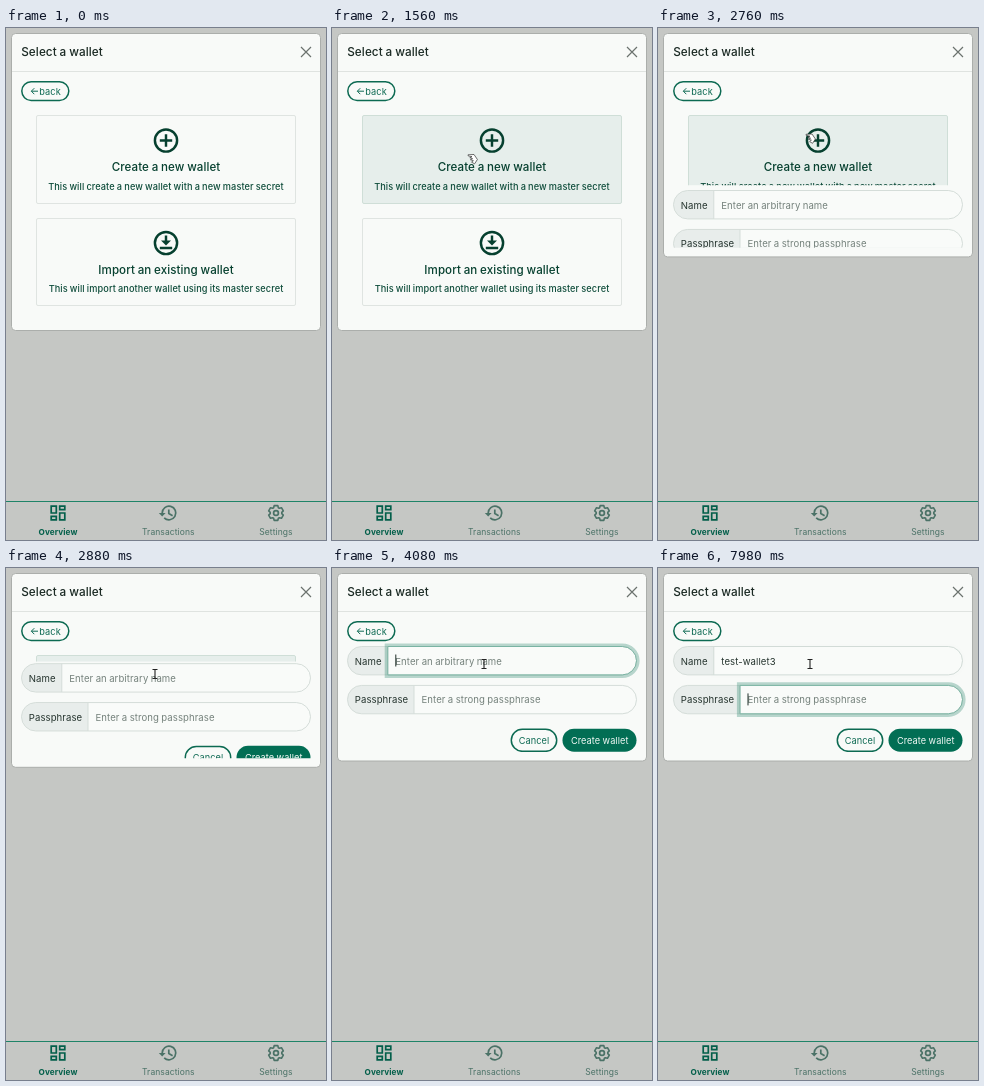
An HTML page for the animation above (8 s loop, 320 by 512 pixels).

```html
<!DOCTYPE html>
<html lang="en">
<head>
<meta charset="utf-8">
<title>Select a wallet</title>
<style>
html, body { margin: 0; height: 100%; overflow: hidden; background: #c5c7c4; }
svg { display: block; width: 100vw; height: 100vh; }
text { font: 400 9.55px Inter, "Open Sans", sans-serif; letter-spacing: .08px; word-spacing: -.4px; fill: #26352f; white-space: pre; }
.mid { text-anchor: middle; }
.title { font-size: 11.75px; font-weight: 500; fill: #1b2a24; }
.heading { font-size: 11.55px; font-weight: 500; fill: #06402f; }
.sub { font-size: 9.2px; font-weight: 500; fill: #0f4d3b; }
.button { font-size: 9.2px; fill: #0f6b54; }
.hint { fill: #75827c; }
.nav { font-size: 8.5px; fill: #4b7267; }
.nav.on { font-size: 8.2px; font-weight: 700; fill: #035f4a; }
.line { fill: none; stroke: #4b7267; stroke-width: 1.7; }
.outline { fill: none; stroke: #0c6a52; stroke-width: 1.5; }
.icon { fill: none; stroke: #06402f; stroke-width: 2.45; }
.card { fill: #f8faf8; stroke: #dfe4e1; }
.card.hover { fill: #e6eeeb; stroke: #cfded7; }
.glow { fill: none; stroke: #006e52; stroke-opacity: .27; stroke-width: 3; }
.edge { fill: none; stroke: #78b3a2; }
.pointer { fill: #fff; stroke: #333; stroke-width: .7; stroke-linejoin: round; }
</style>
</head>
<body>
<svg viewBox="0 0 320 512">
  <defs>
    <clipPath id="listClip"><rect y="77" width="320"/></clipPath>
    <clipPath id="formClip"><rect y="70" width="320"/></clipPath>
  </defs>

  <path d="M0 473.5H320" stroke="#1f8468"/>
  <path fill="#035f4a" transform="translate(41.8 474.8) scale(.85)" d="M19 5v2h-4V5h4M9 5v6H5V5h4m10 8v6h-4v-6h4M9 17v2H5v-2h4M21 3h-8v6h8V3zM11 3H3v10h8V3zm10 8h-8v10h8V11zm-10 4H3v6h8v-6z"/>
  <g class="line" transform="translate(163 485)">
    <path d="M-6.8 0A6.8 6.8 0 1 1-4.8 4.8M-.2-3.6V.5L3.6 2.7"/>
    <path d="M-10.2 0H-3.4L-6.8 3.4Z" fill="#4b7267" stroke="none"/>
  </g>
  <g class="line" transform="translate(270 485)">
    <path id="gear" stroke-linejoin="round" stroke-width="1.6"/><circle r="2.4"/>
  </g>
  <text class="nav on mid" x="52" y="507">Overview</text>
  <text class="nav mid" x="162.3" y="507">Transactions</text>
  <text class="nav mid" x="270" y="507">Settings</text>

  <rect id="modal" x="5.5" y="5.5" width="309" rx="4" fill="#f8faf8" stroke="#abaeab"/>
  <path d="M6 43.5H314" stroke="#dfe3e0"/>
  <text class="title" x="15.2" y="28.3">Select a wallet</text>
  <path d="M295 19l10 10m0-10l-10 10" stroke="#6b726e" stroke-width="1.2"/>
  <rect class="outline" x="15.8" y="53.8" width="47" height="18.6" rx="9.3"/>
  <path d="M32 63.2H25.5M28.3 60.2L25.3 63.2L28.3 66.2" fill="none" stroke="#0f6b54"/>
  <text class="button" x="33.3" y="66.5">back</text>

  <g clip-path="url(#listClip)">
    <rect class="card" x="30.5" y="87.5" width="259" height="88" rx="1.5"/>
    <g class="icon" transform="translate(160 112.5)"><circle r="11.1"/><path d="M-6.2 0H6.2M0-6.2V6.2"/></g>
    <text class="heading mid" x="160" y="143.1">Create a new wallet</text>
    <text class="sub mid" x="160" y="161.7">This will create a new wallet with a new master secret</text>
    <rect class="card" x="30.5" y="190.5" width="259" height="87" rx="1.5"/>
    <g class="icon" transform="translate(160 215)">
      <circle r="11.1"/><path d="M-6.2 5H6.2M0-7.4V-2"/>
      <path d="M-5-2.5H5L0 2.5Z" fill="#06402f" stroke="none"/>
    </g>
    <text class="heading mid" x="160" y="245.6">Import an existing wallet</text>
    <text class="sub mid" x="160" y="264">This will import another wallet using its master secret</text>
  </g>

  <g id="form"><g clip-path="url(#formClip)">
    <g id="fields"></g>
    <rect class="outline" x="179.3" y="161.3" width="45.4" height="22" rx="11"/>
    <text class="button mid" x="202" y="176">Cancel</text>
    <rect x="230.5" y="160.7" width="74" height="23" rx="11.5" fill="#026e54"/>
    <text class="button mid" x="267.7" y="176" style="fill:#f3f9f6">Create wallet</text>
  </g></g>

  <g id="cursor">
    <path class="pointer" d="M0 0V10.5L2.5 8.2 4.2 11.8 5.7 11.1 4.1 7.6H7.4Z"/>
    <path class="pointer" d="M-1 .3L5 0 8.4 5 5.6 9.3 2.6 7.6 4.4 6.2 1.4 5.2 3.6 4.2 .8 3.2 3 2.2-.8 1.4Z"/>
    <path d="M-2.5-4.5H2.5M0-4.5V4.5M-2.5 4.5H2.5" fill="none" stroke="#222" stroke-width="1.1"/>
  </g>
</svg>
<script>
const $ = id => document.getElementById(id);
const all = selector => [...document.querySelectorAll(selector)];
const clamp = v => Math.max(0, Math.min(1, v));
const smooth = v => v * v * (3 - 2 * v);
const cubicOut = v => 1 - (1 - v) ** 3;
const progress = (t, start, length) => clamp((t - start) / length);

const LOOP = 8000, FOCUS_NAME = 3960, FOCUS_PASS = 7845, BLINK = 540;
const WORD = 'test-wallet3';
const KEYS = [5130, 5220, 5280, 5370, 6150, 6300, 6360, 6450, 6570, 6660, 6750, 7170];
const PATH = [ // time, x, y
  [270, 110, 4], [690, 20, 493], [1080, 105, 272], [1380, 152, 68],
  [1560, 137, 126.5], [1890, 149, 106], [3660, 149, 106], [3930, 152, 96]
];

let gear = '';
for (let i = 0; i < 6; i++)
  for (const [angle, r] of [[-24, 5.8], [-14, 7.6], [14, 7.6], [24, 5.8]]) {
    const a = (i * 60 + angle - 90) * Math.PI / 180;
    gear += `${gear ? 'L' : 'M'}${r * Math.cos(a)} ${r * Math.sin(a)}`;
  }
$('gear').setAttribute('d', gear + 'Z');

// Box with square left corners and a round right end
const inputShape = (x, y, grow) => {
  const r = 14.2 + grow;
  return `M${x - grow} ${y - grow}H${304.5 - 14.2}a${r} ${r} 0 0 1 0 ${2 * r}H${x - grow}Z`;
};
const field = (y, split, label, hint) => `
  <rect x="15.5" y="${y}" width="289" height="28.4" rx="14.2" fill="#e8edeb"/>
  <path d="${inputShape(split, y, 0)}" fill="#f9fbf9"/>
  <rect x="15.5" y="${y}" width="289" height="28.4" rx="14.2" fill="none" stroke="#d5ddd9"/>
  <path d="M${split} ${y}v28.4" stroke="#d5ddd9"/>
  <text x="22.8" y="${y + 18}">${label}</text>
  <g class="focus">
    <path class="glow" d="${inputShape(split, y, 1.6)}"/>
    <path class="edge" d="${inputShape(split, y, 0)}"/>
  </g>
  <text class="value hint" x="${split + 7.5}" y="${y + 18}">${hint}</text>
  <rect class="caret" x="${split + 7.5}" y="${y + 8}" width="1" height="12" fill="#20302a"/>`;
const HINT = 'Enter an arbitrary name';
$('fields').innerHTML = field(78.5, 55.8, 'Name', HINT) +
  field(117.4, 82, 'Passphrase', 'Enter a strong passphrase');

const cards = all('.card'), focus = all('.focus'), carets = all('.caret');
const nameText = all('.value')[0];
const pointers = [...$('cursor').children];
const listRect = all('#listClip rect')[0], formRect = all('#formClip rect')[0];
const show = (el, on) => el.setAttribute('visibility', on ? 'visible' : 'hidden');

function cursorAt(t) {
  const i = PATH.findIndex(p => p[0] > t);
  if (i < 0) return PATH[PATH.length - 1].slice(1);
  if (!i) return PATH[0].slice(1);
  const [t0, x0, y0] = PATH[i - 1], [t1, x1, y1] = PATH[i];
  const k = smooth((t - t0) / (t1 - t0));
  return [x0 + (x1 - x0) * k, y0 + (y1 - y0) * k];
}

function draw(t) {
  // The list slides shut while the form slides open
  const list = 1 - cubicOut(progress(t, 2653, 400));
  const open = cubicOut(progress(t, 2668, 400));
  listRect.setAttribute('height', 206 * list);
  formRect.setAttribute('height', open ? 7 + 107 * open : 0);
  $('form').setAttribute('transform', `translate(0 ${216 * list})`);
  $('modal').setAttribute('height', 81.5 + 215.5 * list + 106 * open);

  const [x, y] = cursorAt(t);
  const hovers = [[87, 175], [190, 278]].map(([top, bottom]) =>
    t >= 270 && x > 30 && x < 290 && y > top && y < bottom);
  cards.forEach((card, i) => card.classList.toggle('hover', hovers[i]));
  const kind = t > 2850 ? 2 : hovers.includes(true) ? 1 : 0;
  pointers.forEach((p, i) => show(p, t >= 270 && i === kind));
  $('cursor').setAttribute('transform', `translate(${x} ${y})`);

  const passFocus = smooth(progress(t, FOCUS_PASS, 150));
  focus[0].setAttribute('opacity', smooth(progress(t, FOCUS_NAME - 15, 150)) - passFocus);
  focus[1].setAttribute('opacity', passFocus);

  const typed = KEYS.filter(k => k <= t).length;
  const value = typed ? WORD.slice(0, typed) : HINT;
  if (nameText.textContent !== value) nameText.textContent = value;
  nameText.classList.toggle('hint', !typed);
  carets[0].setAttribute('x', 63.3 + (typed ? nameText.getComputedTextLength() : 0));
  const since = t - (typed ? KEYS[typed - 1] : FOCUS_NAME);
  show(carets[0], since >= 0 && since % (2 * BLINK) < BLINK && t < FOCUS_PASS);
  show(carets[1], t >= FOCUS_PASS);
}

function tick() {
  draw(performance.now() % LOOP);
  requestAnimationFrame(tick);
}
tick();
</script>
</body>
</html>
```
